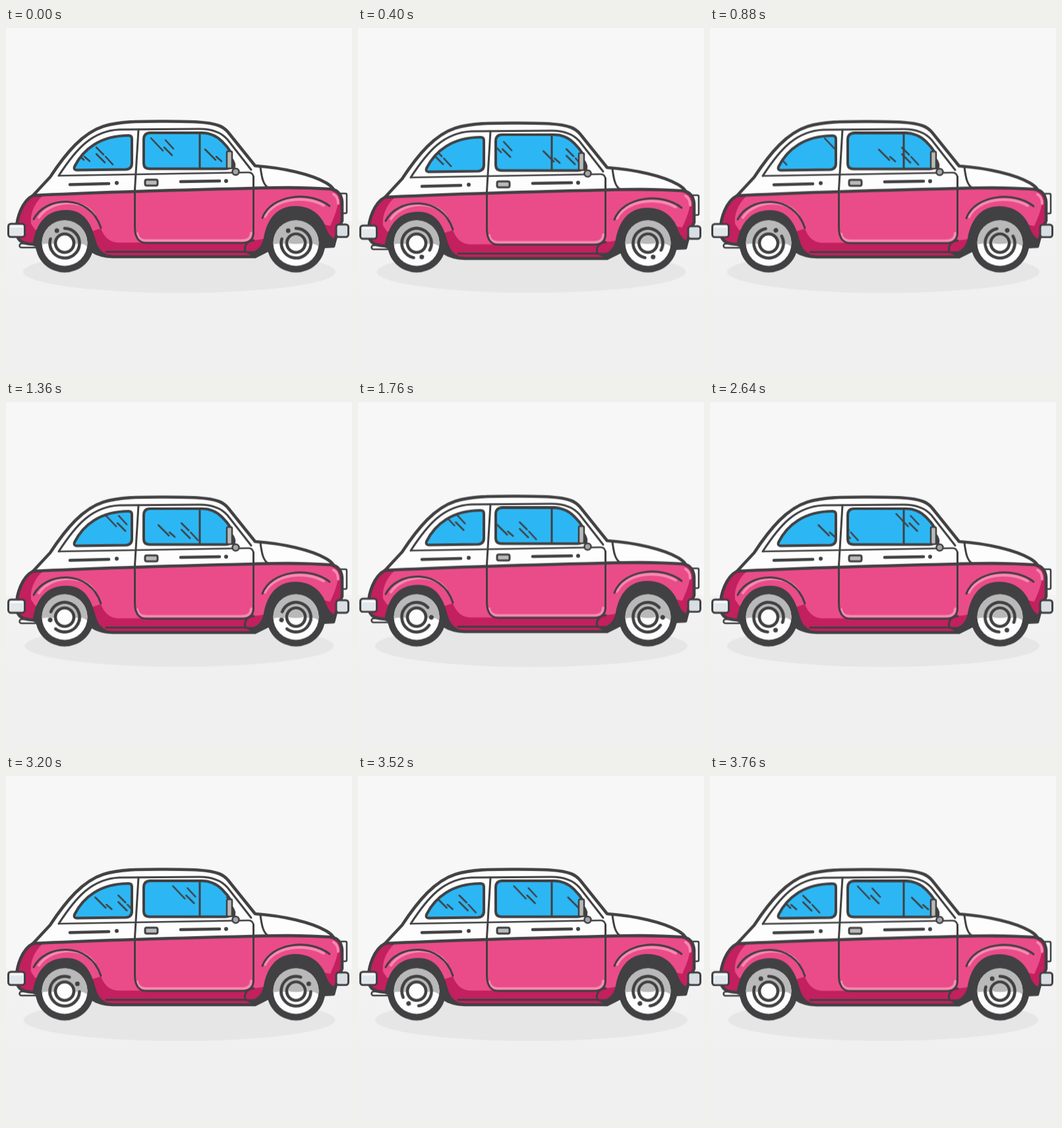
These frames come from a looping animation (525x525 px, 3.84 s). An HTML page without scripts:

```html
<!DOCTYPE html>
<html lang="en">
<head>
<meta charset="utf-8">
<title>Little car</title>
<style>
  html, body { margin: 0; width: 100%; height: 100%; overflow: hidden; background: #f7f7f7; }
  svg { display: block; width: 100vw; height: 100vh; }
  .line { fill: none; stroke: #414042; stroke-width: 3; stroke-linecap: round; stroke-linejoin: round; }
  .thick { stroke-width: 4.6; }
  .thin { stroke-width: 2.5; }
  .ink { fill: #414042; }
  .pink { fill: #ea4c89; }
  .deep { fill: #c2205f; }
  .white { fill: #fdfdfd; }
  .grey { fill: #b9b9b9; }
  .chrome { fill: #e2e7eb; }
  .shine { fill: none; stroke: #f58bb2; stroke-width: 4; stroke-linecap: round; }

  .body { animation: bob .32s step-end infinite; }
  .glare { animation: slide 3.84s steps(48) infinite; }
  .spin { animation: spin 3.84s steps(48) infinite; }
  .shadow { transform-origin: 263px 370px; animation: pulse calc(3.84s / 13) ease-in-out infinite; }

  @keyframes bob {
    0% { transform: translateY(.1px); }
    25% { transform: translateY(2.7px); }
    50% { transform: translateY(1.4px); }
    75% { transform: translateY(.4px); }
  }
  @keyframes slide { to { transform: translateX(-200px); } }
  /* five turns in 47 of the 48 steps */
  @keyframes spin { to { transform: rotate(1838.3deg); } }
  @keyframes pulse { 50% { transform: scale(.988); } }
</style>
</head>
<body>
<svg viewBox="0 0 525 525" preserveAspectRatio="none">
  <defs>
    <linearGradient id="ground" x2="0" y2="1">
      <stop stop-color="#f3f3f3"/>
      <stop offset=".5" stop-color="#f0f0f0"/>
      <stop offset="1" stop-color="#f0f0f0"/>
    </linearGradient>
    <path id="rear-glass" d="M104 210C117 184 143 163 186 163Q191 163 191 168V205Q191 214 182 214.500L107 215.500Q102 215 104 210Z"/>
    <path id="front-glass" d="M219 159H297C311 159 320 164 328 172Q336 180 341 188V206Q341 213.500 333 213.500H218Q209 213.500 209 205V169Q209 159 219 159Z"/>
    <clipPath id="glass">
      <use href="#rear-glass"/>
      <use href="#front-glass"/>
    </clipPath>
    <g id="streaks" class="line thin">
      <path d="M220 167l18 19M242 170l12 13M240 181l12 12"/>
      <path d="M302 184l16 16M319 195l8 7M337 181l11 11M337 191l13 13M351 195l11 12"/>
    </g>
    <g id="tyre">
      <circle class="ink" r="44.500"/>
      <circle class="white" r="34.500"/>
      <path class="grey" d="M-34.400 2A34.500 34.500 0 1 1 34.100 5Q28 0 20 1H-20Q-29 0 -34.400 2Z"/>
    </g>
    <g id="rim">
      <path class="line thick" d="M0 -22.500A22.500 22.500 0 1 1 -21.500 -6.500"/>
      <circle class="ink" cx="-11.800" cy="-19" r="3.500"/>
    </g>
    <g id="hub">
      <circle class="line thick white" r="14" style="fill:#fdfdfd"/>
    </g>
  </defs>

  <rect width="525" height="525" fill="#f7f7f7"/>
  <rect y="293" width="525" height="232" fill="url(#ground)"/>
  <ellipse class="shadow" cx="263" cy="370" rx="237" ry="32" fill="#e6e6e6"/>

  <g class="body">
    <!-- exhaust and headlamp sit behind the shell -->
    <rect class="line thin" x="20.500" y="327" width="30" height="6" rx="3" style="fill:#fafafa"/>
    <rect class="line thin" x="505" y="251" width="12" height="30" rx="2" style="fill:#fafafa"/>

    <!-- lower shell -->
    <path class="line thick" style="fill:#c2205f" d="M41 254C25 262 15 288 16 310C17 324 27 328 44 328L130 338Q142 346 162 347H378L400 336L497 331Q502 310 510 292V264C509 250 501 244 488 243.500C440 241 410 242 375 243C250 246 120 250 41 254Z"/>
    <path class="pink" d="M56 254C42 266 36 284 38 297L44 306L125 310L144 304C150 320 160 325.500 172 325.500H376L395 318L440 290L492 300Q506 270 504 256Q498 246 486 245L375 244Z"/>
    <path class="deep" d="M376 322C366 323 362 332 364 340L380 342L392 320Z"/>

    <!-- wheel arches -->
    <path class="ink" d="M40 330C45 295 62 276 91 276C121 276 130 300 136 322Q140 338 152 343V347Q140 345 130 338H60Z"/>
    <path class="ink" d="M378 348L366 342Q388 338 391 318C397 286 414 270 439 270C466 270 479 287 484 299Q490 318 500 320L498 333H470L400 337Q386 340 378 348Z"/>
    <path class="shine" d="M50 287C66 262 116 256 134 284"/>
    <path class="line" d="M42 290C59 255 127 250 144 303"/>
    <path class="shine" d="M393 286C407 258 455 253 482 269"/>
    <path class="line" d="M389 288C402 253 461 246 491 270"/>
    <path class="shine" d="M497 252Q504 256 504 266"/>

    <!-- sill -->
    <path class="line" d="M152 339.500H364"/>
    <path class="line" d="M376 322C364 323 360 333 364 340L382 340"/>

    <!-- cabin and bonnet -->
    <path class="line thick" style="fill:#fdfdfd" d="M41 254L67 226C92 188 117 159 148 149C174 141 205 141.500 242 141.500C280 141.500 307 142 323 148Q331 151 337 158L378 209C421 212 464 222 486 235Q493 239 497 244.500C440 241 410 242 375 243C250 246 120 250 41 254Z"/>
    <path class="line" d="M80 224C106 184 130 156 172 154L294 153C316 153 328 160 336 169L372 215"/>
    <path class="line thin" d="M80 224L368 219Q375 219 375.500 227"/>
    <path class="line" d="M386 211C388 226 390 238 398 242"/>

    <!-- door -->
    <path class="shine" d="M199 312Q200 322 212 322.500H359Q372 322 372 311"/>
    <path class="line" d="M201 154L195.500 245V300Q195 326 213 326H360Q375.500 325 375.500 310V225"/>

    <!-- windows -->
    <g fill="#2cb7f4">
      <use href="#rear-glass"/>
      <use href="#front-glass"/>
    </g>
    <g clip-path="url(#glass)">
      <g class="glare">
        <use href="#streaks" x="-200"/>
        <use href="#streaks"/>
        <use href="#streaks" x="200"/>
      </g>
    </g>
    <g class="line" style="stroke-width:4">
      <use href="#rear-glass"/>
      <use href="#front-glass"/>
    </g>
    <path class="line" d="M294 159V213"/>

    <!-- trim, handle, mirror -->
    <path class="line thick" d="M97 237.500L156 236M265 233L324 232"/>
    <circle class="ink" cx="168" cy="235" r="3"/>
    <circle class="ink" cx="334" cy="232" r="3"/>
    <rect class="line" x="211" y="230" width="19" height="9" rx="2.500" style="fill:#b9b9b9"/>
    <path class="ink" d="M343 196Q351 206 347 214H341Z"/>
    <rect class="line thin" x="335" y="187" width="8" height="26" rx="2" style="fill:#b9b9b9"/>
    <circle class="line thin" cx="348.500" cy="218" r="5" style="fill:#a5a5a5"/>

    <!-- bumpers -->
    <rect class="chrome" x="3.500" y="297" width="25" height="20" rx="4"/>
    <path d="M8 301H24" stroke="#fafafa" stroke-width="3" stroke-linecap="round"/>
    <rect class="line" x="3.500" y="297" width="25" height="20" rx="4"/>
    <rect class="line" x="501" y="298" width="18.500" height="19" rx="4" style="fill:#d8dee3"/>
  </g>

  <g transform="translate(89 326.500)">
    <use href="#tyre"/>
    <g class="spin"><use href="#rim"/></g>
    <use href="#hub"/>
  </g>
  <g transform="translate(440 326.500)">
    <use href="#tyre"/>
    <g class="spin"><use href="#rim"/></g>
    <use href="#hub"/>
    <path class="grey" d="M-11.500 0A11.500 11.500 0 0 1 11.500 0Q0 2.500 -11.500 0Z"/>
  </g>
</svg>
</body>
</html>
```
